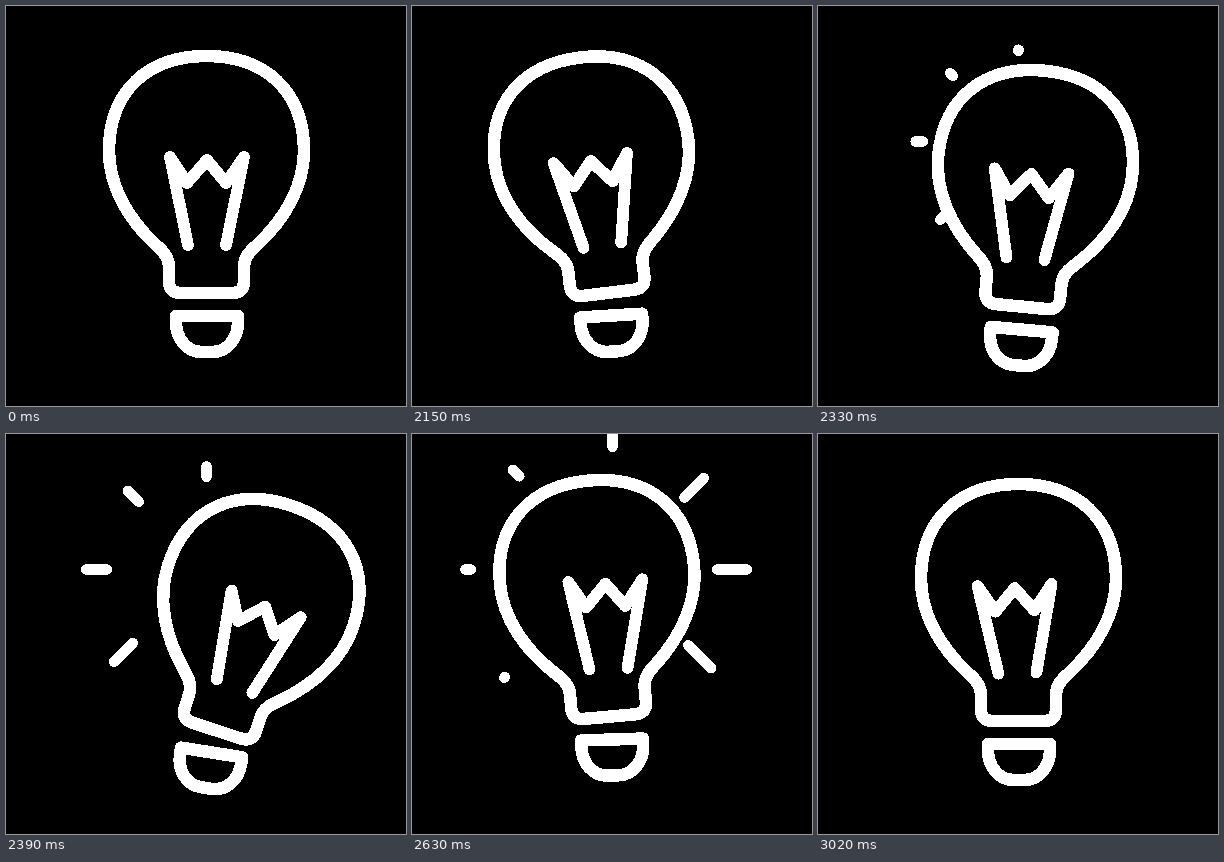
Recreate the animation shown at these times as an HTML page. Size 400 by 400 pixels, loop 3.05 s.

```html
<!DOCTYPE html>
<html lang="en">
<head>
<meta charset="utf-8">
<title>Light bulb</title>
<style>
  html, body { margin: 0; width: 100%; height: 100%; overflow: hidden; background: #000; }
  svg { display: block; width: 100%; height: 100%; shape-rendering: crispEdges; }
  path, line { fill: none; stroke: #fff; stroke-width: 12.5; stroke-linecap: round; stroke-linejoin: round; }
  line { stroke-width: 10.5; }
  #glass { fill: #000; }
  #filament { stroke-width: 11.8; }
</style>
</head>
<body>
<svg viewBox="0 0 400 400">
  <g id="rays"></g>
  <path id="base" d="M170 310H232V316C232 333 221 346 206 346H196C181 346 170 333 170 316Z"/>
  <g id="bulb">
    <path id="glass"
      d="M200.5 50C142 50 103 85 103 145C103 180 122 213 150 239C158 246 163 252 163 261V275Q163 287 175 287
         H226Q238 287 238 275V261C238 252 243 246 251 239C279 213 298 180 298 145C298 85 259 50 200.5 50Z"/>
    <path id="filament" d="M182 239L164 151L181 177L201 154L220 177L238 151L220 239"/>
  </g>
</svg>
<script>
const LOOP = 3050, HOLD = 2030, STEP = 30;
const RAYS = 7, CENTER = { x: 200.5, y: 135.5 };

// Extremes as [step, value], joined by sine easing.
const TILT = [[-2.3, 0], [7, -9], [13, 20], [18.5, -6], [25, 1.5], [31, 0]];
const LIFT = [[0, -1.5], [2.5, -2], [9.8, 13.5], [16.5, -9], [23.5, 0]];

const $ = id => document.getElementById(id);
const clamp = x => Math.min(1, Math.max(0, x));
const mix = (a, b, u) => a + (b - a) * u;
const ease = u => (1 - Math.cos(Math.PI * clamp(u))) / 2;

function valueAt(keys, k) {
  return keys.reduce((value, [end, next], i) => {
    if (i === 0) return next;
    const start = keys[i - 1][0];
    return mix(value, next, ease((k - start) / (end - start)));
  }, 0);
}

// The filament trails slightly, then whips over after the bulb's swing.
function whip(k) {
  const x = k - 16;
  return 15 * Math.exp(-((x / 5.5) ** 2)) * Math.cos(x / 4) - 1.8 * clamp(k / 8);
}

// Rays run clockwise from the lower left; the right side fires later, all at once.
const rays = Array.from({ length: RAYS }, (_, i) => {
  const level = Math.min(i, RAYS - 1 - i);
  const line = document.createElementNS("http://www.w3.org/2000/svg", "line");
  $("rays").appendChild(line);
  return {
    line,
    angle: (135 + 45 * i) * Math.PI / 180,
    inner: 96 - 2 * level,
    outer: 153 - 6 * level,
    delay: i < 4 ? 0.6 * i - 0.9 : 6.2
  };
});

function drawRay({ line, angle, inner, outer, delay }, k) {
  const age = k - delay - 8;
  const tail = clamp(age / 13) ** 2;
  const head = ease(age / 8.6);
  line.style.display = age > 0 && tail < 1 ? "" : "none";
  [tail, head].forEach((u, i) => {
    const r = mix(inner, outer, u);
    line.setAttribute("x" + (i + 1), CENTER.x + r * Math.cos(angle));
    line.setAttribute("y" + (i + 1), CENTER.y + r * Math.sin(angle));
  });
}

function pose(id, angle, pivot, lift = 0) {
  $(id).setAttribute("transform", `translate(0 ${lift}) rotate(${angle} ${CENTER.x} ${pivot})`);
}

function draw(time) {
  const t = time % LOOP;
  const moving = t >= HOLD;
  const k = Math.floor((t - HOLD) / STEP);
  const lift = moving ? valueAt(LIFT, k) : 0;
  pose("bulb", moving ? valueAt(TILT, k) : 0, 320, lift);
  pose("base", moving ? 0.45 * valueAt(TILT, k + 0.8) : 0, 340, lift);
  pose("filament", moving ? whip(k) : 0, 290);
  rays.forEach(ray => drawRay(ray, k));
}

const start = performance.now();
function tick() {
  draw(performance.now() - start);
  requestAnimationFrame(tick);
}
tick();
</script>
</body>
</html>
```
